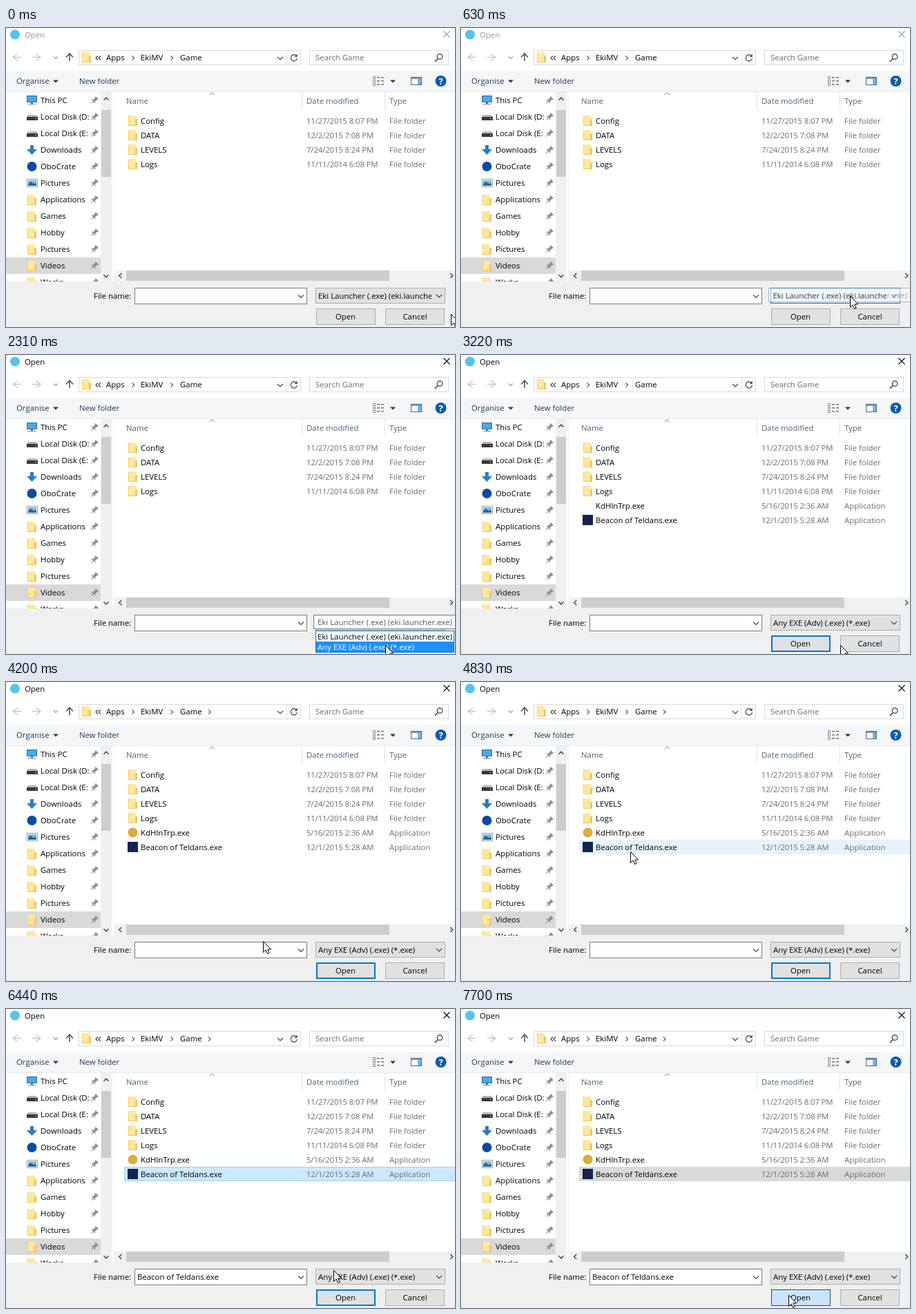
Animation, 650 px wide and 434 px high, one loop 7840 ms. Source, as an HTML page:

```html
<!DOCTYPE html>
<html lang="en">
<head>
<meta charset="utf-8">
<title>Open dialog</title>
<style>
html, body { margin: 0; width: 100%; height: 100%; overflow: hidden; background: #fff; }
svg { display: block; width: 650px; height: 434px; }
text { font: 11.4px "Open Sans", "Noto Sans", sans-serif; white-space: pre; }
.date { letter-spacing: -.15px; }
</style>
</head>
<body>
<svg id="stage" viewBox="0 0 650 434" xmlns="http://www.w3.org/2000/svg"></svg>
<script>
const LOOP = 7840, TICK = 70;
const GREY = '#6d6d6d', BLUE = '#0078d7';
const APP = 'Beacon of Teldans.exe';
const FILTERS = ['Eki Launcher (.exe) (eki.launcher.exe)', 'Any EXE (Adv) (.exe) (*.exe)'];

// Markup helpers
const text = (x, y, s, fill = '#000', more = '') =>
  `<text x="${x}" y="${y}" fill="${fill}" ${more}>${s}</text>`;
const rect = (x, y, w, h, fill, more = '') =>
  `<rect x="${x}" y="${y}" width="${w}" height="${h}" fill="${fill}" ${more}/>`;
const box = (x, y, w, h, fill, line, more = '') =>
  rect(x + .5, y + .5, w - 1, h - 1, fill, `stroke="${line}" ${more}`);
const line = (d, color, width = 1, more = '') =>
  `<path d="${d}" fill="none" stroke="${color}" stroke-width="${width}" ${more}/>`;
const shape = (d, fill) => `<path d="${d}" fill="${fill}"/>`;
const disc = (x, y, r, fill) => `<circle cx="${x}" cy="${y}" r="${r}" fill="${fill}"/>`;
const group = (id, body, more = '') => `<g id="${id}" ${more}>${body}</g>`;

// Chevron with its centre at x, y
const chevron = (x, y, dir, color = '#444', r = 4, width = 1.2) => {
  const angle = { down: 0, left: 90, up: 180, right: 270 }[dir];
  return line(`M${-r} ${-r / 2}L0 ${r / 2}L${r} ${-r / 2}`, color, width,
    `transform="translate(${x} ${y}) rotate(${angle})"`);
};
const folder = (x, y) =>
  rect(x, y, 11, 14, '#ffe79c') + rect(x, y, 1, 14, '#f3cf6b') +
  rect(x + 10, y + 5, 3, 10, '#f0c75f') + rect(x, y + 14, 11, 1, '#eec560');
const pin = y =>
  `<g transform="translate(128 ${y}) rotate(45)">` +
  rect(-2, -5, 4, 6, '#8a8f94') + rect(-3.5, 1, 7, 1.6, '#8a8f94') +
  rect(-3, -5.5, 6, 1.4, '#8a8f94') + rect(-.5, 2, 1, 4.5, '#8a8f94') + '</g>';

function titleBar() {
  return disc(13, 9.5, 7, '#55c3ee') +
    group('title', text(27, 14, 'Open', 'currentColor') +
      line('M633.5 4.5l9 9m0 -9l-9 9', 'currentColor', 1.1));
}

function addressBar() {
  const arrow = (x, s, c) => line(`M${x} 42.5h${s * 12}m${-s * 7} -5l${s * 7} 5l${-s * 7} 5`, c, 1.4);
  const sep = x => chevron(x, 43.5, 'right', '#555', 3.2);
  return arrow(22, -1, '#c8c8c8') + arrow(38, 1, '#c8c8c8') +
    chevron(72, 43, 'down', '#999', 3) +
    line('M92 48v-11m-5 5.5l5 -5.5l5 5.5', '#555', 1.6) +
    box(105, 32, 322, 22, '#fff', '#d9d9d9') + folder(110, 35) +
    line('M133 40.5l-3 3l3 3m4 -6l-3 3l3 3', '#333', 1.1) +
    text(145, 47, 'Apps') + sep(184) + text(195, 47, 'EkiMV') + sep(240) +
    text(252, 47, 'Game') + group('lastSep', sep(294.5)) +
    chevron(397, 44, 'down') + rect(406, 33, 1, 20, '#e3e3e3') +
    line('M420.5 40.5a4.6 4.6 0 1 0 1 3.5', '#555', 1.4) +
    shape('M421.8 37.5v4.5h-4.5z', '#555') +
    box(439, 32, 202, 22, '#fff', '#d9d9d9') + text(448, 47, 'Search Game', GREY) +
    `<circle cx="628" cy="41.5" r="3.8" fill="none" stroke="#555" stroke-width="1.4"/>` +
    line('M625.3 44.3l-4.5 4.5', '#555', 1.8);
}

function toolbar() {
  let s = rect(0, 62, 650, 30, '#f5f6f7') + rect(0, 92, 650, 1, '#e8e9ea') +
    text(15, 81, 'Organise', '#1e395b') + shape('M68 75.5h8l-4 4z', '#1e395b') +
    text(106, 81, 'New folder', '#1e395b');
  for (const y of [71, 76, 81])
    s += box(531, y - 1, 4, 4, '#fff', '#8b9097') +
      rect(537, y, 4, 1.5, '#777') + rect(543, y, 4, 1.5, '#777');
  return s + shape('M556 75.5h8l-4 4z', '#1e395b') +
    box(586, 71, 16, 12, '#fff', '#4b6b8d') + rect(587, 72, 14, 2, '#7d98b5') +
    rect(596, 74, 5, 8, '#6db4ea') +
    disc(629.5, 77, 8, '#0b5cad') +
    text(629.5, 81.5, '?', '#fff', 'text-anchor="middle" style="font-weight:700;font-size:13px"');
}

function sideIcon(kind, y) {
  if (kind === 'pc') return box(30, y - 7, 15, 10, '#4aa9e6', '#2a6f9f') +
    rect(36, y + 3, 3, 2, '#6b7f8c') + rect(32, y + 5, 11, 1, '#6b7f8c');
  if (kind === 'disk') return shape(`M32 ${y - 3}h12l2 3h-16z`, '#b4b7bc') +
    rect(30, y, 16, 5, '#36373f') + rect(42, y + 2, 2, 1, '#9ad8ff');
  if (kind === 'down') return shape(`M35 ${y - 7}h5v6h5l-7.5 8l-7.5 -8h5z`, '#2b7cc4');
  if (kind === 'cloud') return disc(37.5, y, 7, '#0a4aa6');
  if (kind === 'picture') return box(30, y - 6, 16, 12, '#fff', '#9a9a9a') +
    rect(32, y - 4, 12, 8, '#74c0f0') + shape(`M32 ${y + 4}v-3l4 -3l4 3l4 -1v4z`, '#34658a');
  return folder(31, y - 7);
}

function sidebar() {
  const items = [['This PC', 'pc'], ['Local Disk (D:', 'disk'], ['Local Disk (E:', 'disk'],
    ['Downloads', 'down'], ['OboCrate', 'cloud'], ['Pictures', 'picture'], ['Applications'],
    ['Games'], ['Hobby'], ['Pictures'], ['Videos'], ['Works']];
  const rows = items.map(([name, kind], i) => {
    const y = 105 + i * 24;
    return (name === 'Videos' ? rect(0, y - 12, 137, 24, '#d9d9d9') : '') +
      sideIcon(kind, y) + text(50, y + 4, name, '#000', 'clip-path="url(#nameClip)"') + pin(y);
  }).join('');
  return `<g clip-path="url(#sideClip)">${rows}</g>` +
    rect(137, 93, 16, 275, '#f0f0f0') + rect(138, 119, 14, 97, '#cdcdcd') +
    chevron(145, 103, 'up', '#505050', 3.5, 1.6) + chevron(145, 360, 'down', '#505050', 3.5, 1.6) +
    rect(155, 93, 1, 275, '#f0f0f0');
}

function fileRow(i, name, date, type = 'File folder') {
  const y = 139 + i * 21;
  return text(195, y, name) + text(435, y, date, GREY, 'class="date"') + text(555, y, type, GREY);
}

function filePane() {
  const head = '#4c607a';
  const folders = [['Config', '11/27/2015 8:07 PM'], ['DATA', '12/2/2015 7:08 PM'],
    ['LEVELS', '7/24/2015 8:24 PM'], ['Logs', '11/11/2014 6:08 PM']];
  return text(174, 110, 'Name', head) + text(435, 110, 'Date modified', head) +
    text(555, 110, 'Type', head) + chevron(298.5, 95.5, 'up', '#777', 3.5, 1) +
    rect(428, 93, 1, 26, '#e3e3e3') + rect(548, 93, 1, 26, '#e3e3e3') +
    folders.map(([n, d], i) => folder(177, 127 + i * 21) + fileRow(i, n, d)).join('') +
    '<rect id="row" x="171.5" y="229.5" width="482" height="20"/>' +
    group('programs', fileRow(4, 'KdHlnTrp.exe', '5/16/2015 2:36 AM', 'Application') +
      fileRow(5, APP, '12/1/2015 5:28 AM', 'Application') + rect(176, 232, 15, 15, '#14234f')) +
    group('lateIcon', disc(183.5, 218.5, 7, '#d9ae3c')) +
    rect(157, 352, 493, 16, '#f0f0f0') +
    '<rect id="thumb" x="174" y="352" width="381" height="15"/>' +
    chevron(165.5, 359.5, 'left', '#505050', 3.5, 1.6) +
    chevron(645, 359.5, 'right', '#505050', 3.5, 1.6);
}

function footer() {
  const mid = 'text-anchor="middle"';
  return rect(0, 368, 650, 66, '#f0f0f0') + text(127, 393, 'File name:') +
    box(186, 377, 250, 24, '#fff', '#7a7a7a') + chevron(427, 389.5, 'down') +
    group('fileName', text(190, 393, APP)) +
    box(448, 377, 188, 23, '#e1e1e1', '#adadad', 'id="combo"') +
    `<text id="filter" x="452" y="393" clip-path="url(#comboClip)"></text>` +
    chevron(627, 389, 'down') +
    '<rect id="open"/>' + text(491.5, 423, 'Open', '#000', mid) +
    box(549, 407, 86, 24, '#e1e1e1', '#adadad') + text(592, 423, 'Cancel', '#000', mid);
}

function popups() {
  const option = i => rect(449, 401 + i * 15, 199, 15, '#fff', `id="option${i}"`) +
    `<text id="label${i}" x="451" y="${413 + i * 15}">${FILTERS[i]}</text>`;
  return `<g clip-path="url(#listClip)">` +
    group('list', box(448, 400, 201, 32, '#fff', BLUE, 'id="listFrame"') + option(0) + option(1)) +
    '</g>' +
    group('tip', box(445, 377, 210, 21, '#fff', '#767676') + text(451, 392, FILTERS[0], '#575757'));
}

const clip = (id, x, y, w, h) => `<clipPath id="${id}">${rect(x, y, w, h, '#000')}</clipPath>`;
const stage = document.getElementById('stage');
stage.innerHTML = '<defs>' + clip('nameClip', 50, 90, 71, 300) + clip('sideClip', 0, 93, 137, 275) +
  clip('comboClip', 449, 378, 167, 21) + clip('listClip', 440, 398, 210, 36) + '</defs>' +
  rect(0, 0, 650, 434, '#fff') + titleBar() + addressBar() + toolbar() + sidebar() +
  filePane() + footer() + popups() +
  '<path id="cursor" d="M.5 .5V16.5L4.2 13L6.7 18.5L9.2 17.4L6.8 12H11.6Z" fill="#fff" stroke="#000"/>';

const el = {};
for (const node of stage.querySelectorAll('[id]')) el[node.id] = node;
const set = (id, attrs) => {
  for (const key in attrs) el[id].setAttribute(key, attrs[key]);
};
const show = (id, on) => set(id, { visibility: on ? 'visible' : 'hidden' });

// Pointer stops: time, x, y
const PATH = [
  [0, 644, 415], [210, 600, 398], [490, 563, 389], [840, 563, 389], [910, 564, 389],
  [1820, 564, 389], [2310, 549, 421], [3920, 549, 421], [4200, 372, 376], [4480, 272, 300],
  [4760, 245, 251], [4830, 245, 246], [5670, 245, 246], [6020, 464, 324], [6160, 464, 324],
  [6440, 474, 379], [6720, 474, 414], [6790, 474, 414], [6860, 474, 415], [LOOP, 474, 415]
];
function pointer(t) {
  t = Math.max(0, t);
  const i = PATH.findIndex(p => p[0] > t);
  const [t0, x0, y0] = PATH[i - 1], [t1, x1, y1] = PATH[i];
  const k = (t - t0) / (t1 - t0);
  return [Math.round(x0 + (x1 - x0) * k), Math.round(y0 + (y1 - y0) * k)];
}
const inside = ([x, y], l, t, r, b) => x >= l && x < r && y >= t && y < b;

function draw(time) {
  const t = Math.floor(time / TICK) * TICK;
  const pos = pointer(t);
  const listOpen = t >= 1190 && t < 2940;
  const picked = t >= 2940, selected = t >= 5180, pressed = t >= 7700;

  el.title.setAttribute('color', t < 1120 ? '#999' : '#000');
  show('lastSep', t >= 3500);
  show('programs', t >= 3220);
  show('lateIcon', t >= 3360);
  show('fileName', selected);

  show('row', t >= 4760);
  const rowFill = pressed ? '#d9d9d9' : selected ? '#cce8ff' : '#e5f3ff';
  set('row', { fill: rowFill, stroke: selected && !pressed ? '#99d1ff' : rowFill });
  set('thumb', { fill: inside(pos, 174, 352, 555, 367) ? '#a6a6a6' : '#cdcdcd' });

  const comboHot = inside(pointer(t - TICK), 448, 377, 636, 400);
  set('combo', { fill: comboHot ? '#e5f1fb' : '#e1e1e1', stroke: comboHot ? BLUE : '#adadad' });
  el.filter.textContent = FILTERS[picked ? 1 : 0];

  const ready = t >= 3220;
  const openHot = ready && inside(pos, 449, 407, 535, 431);
  const edge = ready && !pressed && !openHot ? 2 : 1;
  set('open', {
    x: 449 + edge / 2, y: 407 + edge / 2, width: 86 - edge, height: 24 - edge,
    fill: pressed ? '#cce4f7' : openHot ? '#e5f1fb' : '#e1e1e1',
    stroke: pressed ? '#005499' : ready ? BLUE : '#adadad', 'stroke-width': edge
  });

  show('tip', t >= 630 && !picked);
  set('tip', { opacity: t < 700 ? .5 : 1 });
  show('list', listOpen);
  const slide = Math.max(0, (1330 - t) / TICK) * 11;
  set('list', { transform: `translate(0 ${-slide})` });
  set('listFrame', { stroke: slide ? '#000' : BLUE });
  const hot = pos[1] >= 416 ? 1 : 0;
  for (const i of [0, 1]) {
    set('option' + i, { fill: i === hot ? '#1e90ff' : '#fff' });
    set('label' + i, { fill: i === hot ? '#fff' : '#000' });
  }

  set('cursor', { transform: `translate(${pos[0]} ${pos[1]})` });
}

const start = performance.now();
function frame() {
  draw((performance.now() - start) % LOOP);
  requestAnimationFrame(frame);
}
frame();
</script>
</body>
</html>
```
